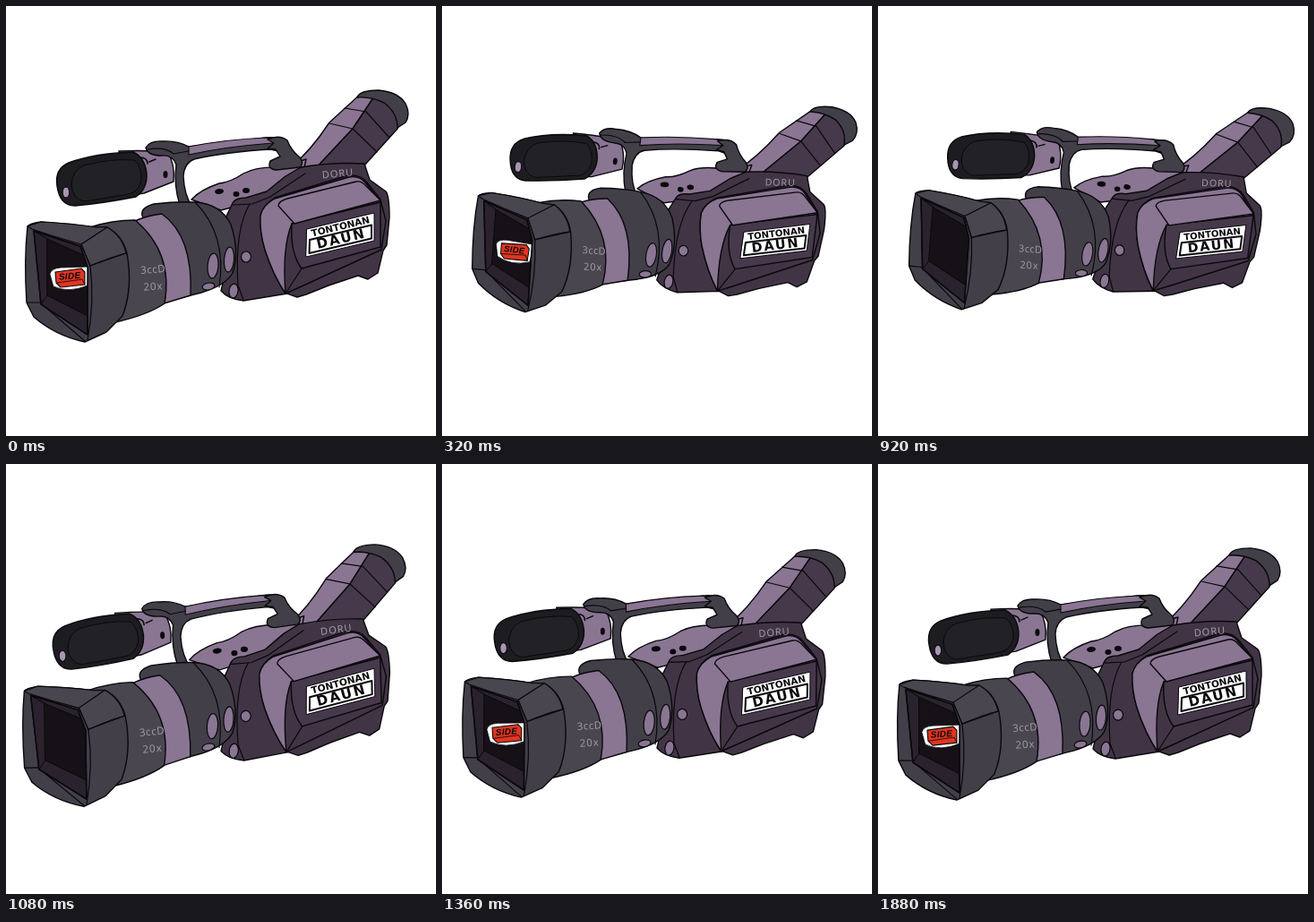
These frames come from a looping animation (480 px wide and 480 px high, 1.92 s). An HTML page with a canvas:

```html
<!DOCTYPE html>
<html lang="id">
<head>
<meta charset="utf-8">
<title>Camcorder</title>
<style>
html, body { margin: 0; width: 100%; height: 100%; overflow: hidden; background: #fff; }
canvas { display: block; width: 480px; height: 480px; }
</style>
</head>
<body>
<canvas id="stage" width="480" height="480"></canvas>
<script>
const ctx = document.getElementById('stage').getContext('2d');
const LOOP = 1920, HALF = LOOP / 2;
const INK = '#09080b', DARK = '#433f49', GREY = '#4a4650', BODY = '#413545',
      SHADE = '#47394c', LILAC = '#8a7593', PALE = '#a795b2';
let lift = 0;

// Quick move, then a damped swing around the new pose.
function spring(ms) {
  if (ms < 80) return ms / 80;
  const t = ms - 80;
  return 1 + 0.42 * Math.exp(-t * 0.005) * Math.sin(t * Math.PI / 200);
}

function liftAt(t) {
  return t < HALF ? spring(t) : 1 - spring(t - HALF);
}

// The sticker leaves the lens to the left and returns from the right.
function slideAt(t) {
  if (t < 160) return 0;
  if (t < 800) return -60 * ((t - 160) / 600) ** 4;
  if (t < 1100) return 70;
  return 70 * Math.max(0, 1 - (t - 1100) / 220) ** 3;
}

// Bends the lowered camera towards its raised pose.
function bend(x, y) {
  const u = (x - 240) / 200, v = (y - 230) / 130;
  return [
    x + lift * (8.5 - 10 * u - 15 * v - 2.5 * u * v + 3 * v * v),
    y + lift * (28.5 * u - 3 * u ** 3 - 6 * v - 9)
  ];
}

function path(d) {
  return new Path2D(d.replace(/(-?[\d.]+),(-?[\d.]+)/g, (m, x, y) =>
    bend(+x, +y).map(n => n.toFixed(2)).join(',')));
}

function paint(p, fill, width) {
  ctx.fillStyle = fill;
  ctx.fill(p);
  if (width) {
    ctx.lineWidth = width;
    ctx.stroke(p);
  }
}

function shape(d, fill, width = 1.4) {
  paint(path(d), fill, width);
}

function line(d, width = 1.2) {
  ctx.lineWidth = width;
  ctx.stroke(path(d));
}

// Runs a drawing in a frame that follows the bend around (x, y).
function at(x, y, angle, draw) {
  const [ox, oy] = bend(x, y), [ax, ay] = bend(x + 1, y), [bx, by] = bend(x, y + 1);
  ctx.save();
  ctx.transform(ax - ox, ay - oy, bx - ox, by - oy, ox, oy);
  ctx.rotate(angle);
  draw();
  ctx.restore();
}

function oval(x, y, rx, ry, angle, fill, width = 1.2) {
  at(x, y, angle, () => {
    const p = new Path2D();
    p.ellipse(0, 0, rx, ry, 0, 0, 7);
    paint(p, fill, width);
  });
}

function label(s, font, fill, gap = 0) {
  ctx.font = font;
  ctx.letterSpacing = gap + 'px';
  ctx.fillStyle = fill;
  ctx.fillText(s, gap / 2, 0);
}

function text(s, x, y, angle, font, fill, gap) {
  at(x, y, angle, () => label(s, font, fill, gap));
}

function viewfinder() {
  shape('M316,182 Q340,162 361,130 L396,98 L411,101 L387,137 L345,182 Z', LILAC);
  shape('M411,101 Q430,106 441,122 L437,137 L400,178 L345,182 L387,137 Z', SHADE);
  line('M361,131 L387,137 L414,163');
  line('M378,114 L402,118 L428,147');
  shape('M392,102 Q395,94 416,94 Q438,96 446,109 Q452,121 446,130 L437,136 Q437,119 422,108 Q408,101 392,102 Z', DARK);
}

function body() {
  shape('M207,216 Q217,205 238,198 Q250,197 265,187 Q280,179 306,180 L335,171 L331,190 L262,222 L240,228 Z', LILAC);
  oval(238, 207, 5, 3, -0.1, INK, 0);
  oval(257, 210, 3.5, 3, 0, INK, 0);
  oval(268, 206, 4, 3, 0, INK, 0);
  shape('M241,245 L253,220 Q256,214 268,214 L291,207 L312,190 L329,180 Q365,174 400,176 L406,194 L424,207 Q428,212 428,236 L425,267 L421,273 L415,298 L404,305 L393,301 L360,312 L335,322 L325,325 L314,321 L265,329 Q248,327 240,318 L246,292 Z', BODY);
  line('M253,222 L275,221 L295,213 L334,187');
  line('M272,221 Q255,250 259,312 L265,328');

  shape('M284,234 Q287,222 300,214 L382,189 Q396,188 403,197 L418,216 L424,240 L419,272 L332,312 L312,321 Q298,300 289,272 Q283,252 284,234 Z', BODY);
  shape('M284,234 Q287,222 300,215 L383,191 Q394,189 401,197 L418,219 L319,243 Q308,270 312,321 Q298,300 289,272 Q283,252 284,234 Z', LILAC);
  shape('M319,243 L418,219 L418,269 L330,293 Q317,276 319,243 Z', SHADE);
  shape('M304,223 Q304,218 314,215 L391,196 Q397,195 402,201 L418,217 L322,243 Z', LILAC);
  line('M330,293 L312,321');

  oval(268, 280, 5.5, 6, 0, LILAC);
  oval(254, 318, 5, 8, 0.15, LILAC);
  text('DORU', 370, 188, -0.1, '11px "Open Sans", "Noto Sans", sans-serif', '#aaa0b2', 1);

  shape('M336,249 L411,231 L411,262 L335,280 Z', '#fff', 1);
  text('TONTONAN', 373.5, 247, -0.235, 'bold 10.5px "DejaVu Sans", sans-serif', INK);
  shape('M339,261 L408,244.5 L408,259.5 L338.5,276 Z', '#fff', 2);
  text('DAUN', 373.5, 261, -0.235, 'bold 15px "DejaVu Sans", sans-serif', INK, 2);
}

function mic() {
  shape('M126,162 Q150,161 165,162 L181,164 Q189,178 187,196 L154,209 L140,211 Z', LILAC);
  line('M149,169 Q158,169 158,176', 1.6);
  line('M160,174 L167,171', 1.4);
  oval(178, 188, 2.5, 4, 0, INK, 0);
  shape('M57,201 Q54,182 70,175 Q100,164 142,163 Q155,169 157,187 Q158,204 145,213 Q110,220 77,223 Q60,223 57,201 Z', '#1d1c20');
  shape('M73,199 Q74,184 87,178 Q116,170 143,172 Q152,180 151,195 Q148,207 137,210 L88,218 Q74,216 73,199 Z', '#222125', 1);
  oval(67, 208, 3.8, 6, 0, PALE, 1);
}

function handle() {
  shape('M156,158 Q161,150 175,151 Q191,150 204,157 L290,147 Q305,145 314,153 L309,163 L295,160 Q245,163 210,171 Q199,175 198,190 Q199,212 208,224 L194,222 Q187,200 190,177 Q186,166 174,167 Q158,167 156,158 Z', DARK);
  shape('M204,157 Q245,149 290,147 L303,149 L298,153 Q245,157 204,166 Z', LILAC, 1.1);
  shape('M292,149 Q305,143 314,150 Q318,161 328,169 Q333,176 328,180 L302,183 Q291,182 295,173 L306,168 L301,160 L292,159 L299,153 Z', DARK);
  line('M158,160 Q178,157 187,165 L204,162');
}

function barrel() {
  shape('M152,234 Q150,225 165,221 Q190,218 211,219 Q240,221 251,244 Q261,274 253,298 Q245,312 218,320 L190,327 Z', DARK);
  line('M211,219 Q247,255 238,314');
  shape('M144,240 Q157,234 174,232 Q209,257 206,323 L173,333 Q187,280 144,240 Z', LILAC);
  shape('M94,247 Q118,239 144,239 Q187,275 177,332 Q158,345 122,353 Z', GREY);
  oval(231, 290, 6, 14, 0.08, LILAC);
  oval(249, 283, 5.5, 14, 0.08, LILAC);
  oval(226, 313, 7, 3.8, -0.2, LILAC);
  const font = '11.5px "Open Sans", "Noto Sans", sans-serif';
  text('3ccD', 164, 295, -0.07, font, '#a59eab', 0.5);
  text('20x', 164, 314, -0.07, font, '#a59eab', 1);
}

function sticker(slide) {
  at(71 + slide, 304 + 3 * lift, 0.1 * lift, () => {
    paint(new Path2D('M-22,-5 Q-21,-11 -10,-12 L22,-13 L20,8 Q-1,17 -18,9 Z'), '#fff', 0.8);
    paint(new Path2D('M-16,-7 L13,-11 L17,-7 L17,7 L-10,10 L-15,5 Z'), '#e03520', 1.1);
    ctx.lineWidth = 0.8;
    ctx.stroke(new Path2D('M-14,5 L14,1 L17,7'));
    ctx.translate(0, -2);
    ctx.rotate(-0.08);
    label('SIDE', 'italic bold 10px "Liberation Sans", sans-serif', INK, 0.3);
  });
}

function hood(slide) {
  shape('M24,246 Q26,243 39,241 Q75,243 100,247 L113,247 Q130,256 135,276 Q142,315 130,346 L112,364 L88,375 Q55,368 31,347 L23,331 Q20,283 24,246 Z', DARK);
  shape('M24,246 L39,241 Q75,243 100,247 L113,247 L84,266 Q55,258 29,249 Z', GREY, 1.1);
  shape('M84,266 L113,247 Q130,257 134,276 L94,290 Z', GREY, 1.1);
  line('M94,290 Q120,279 134,276');
  line('M84,266 L94,290 Q99,330 91,373');
  line('M24,331 L38,331 L88,374');

  const hole = 'M31,251 L83,268 L91,291 L91,367 L39,333 Z';
  shape(hole, '#2a222c');
  ctx.save();
  ctx.clip(path(hole));
  shape('M46,260 L95,282 L95,348 L46,323 Z', '#151116', 1);
  line('M31,251 L46,260 M39,333 L46,323', 1);
  sticker(slide);
  ctx.restore();
  line(hole, 1.4);
}

function draw(t) {
  lift = liftAt(t);
  ctx.fillStyle = '#fff';
  ctx.fillRect(0, 0, 480, 480);
  viewfinder();
  body();
  mic();
  handle();
  barrel();
  hood(slideAt(t));
}

ctx.strokeStyle = INK;
ctx.lineJoin = ctx.lineCap = 'round';
ctx.textAlign = 'center';
ctx.textBaseline = 'middle';

const start = performance.now();
function tick() {
  const t = (performance.now() - start) % LOOP;
  draw(Math.floor(t / 40) * 40);
  requestAnimationFrame(tick);
}
tick();
</script>
</body>
</html>
```
